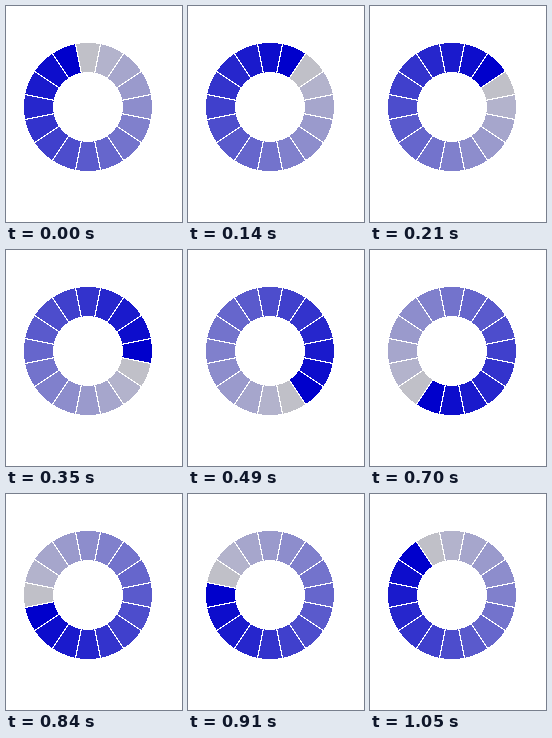
Animation, 176 px wide and 216 px high, one loop 1.12 s. Source, as an HTML page:

```html
<!DOCTYPE html>
<html>
<head>
<meta charset="utf-8">
<style>
  html, body { margin: 0; width: 100%; height: 100%; overflow: hidden; background: #fff; }
  svg { display: block; }
</style>
</head>
<body>
<svg width="176" height="216" shape-rendering="crispEdges"></svg>
<script>
const COUNT = 16, STEP = 70, CX = 82, CY = 101, OUTER = 64, INNER = 35;
const svg = document.querySelector('svg');

function add(name, attrs) {
  const el = document.createElementNS('http://www.w3.org/2000/svg', name);
  for (const key in attrs) el.setAttribute(key, attrs[key]);
  return svg.appendChild(el);
}

// Point on the ring, measured in segments clockwise from the top
function point(pos, r) {
  const a = pos * 2 * Math.PI / COUNT;
  return [CX + r * Math.sin(a), CY - r * Math.cos(a)];
}

const segments = Array.from({ length: COUNT }, (_, i) => add('path', {
  d: `M${CX} ${CY}L${point(i - 0.5, OUTER)}A${OUTER} ${OUTER} 0 0 1 ${point(i + 0.5, OUTER)}Z`
}));

for (let i = 0; i < COUNT; i++) {
  const [x, y] = point(i + 0.5, OUTER + 1);
  add('line', { x1: CX, y1: CY, x2: x, y2: y, stroke: '#fff', 'stroke-width': 1.2 });
}
add('circle', { cx: CX, cy: CY, r: INNER, fill: '#fff' });

// Shades run clockwise from grey at the head to deep blue just behind it
const shade = k => {
  const v = Math.round(192 * (1 - k / (COUNT - 1)));
  return `rgb(${v},${v},${k ? 204 : 200})`;
};

let shown = -1;
function draw(now) {
  const head = Math.floor(now / STEP) % COUNT;
  if (head !== shown) {
    segments.forEach((seg, i) => seg.setAttribute('fill', shade((i - head + COUNT) % COUNT)));
    shown = head;
  }
}

const start = performance.now();
function tick() {
  draw(performance.now() - start);
  requestAnimationFrame(tick);
}
tick();
</script>
</body>
</html>
```
